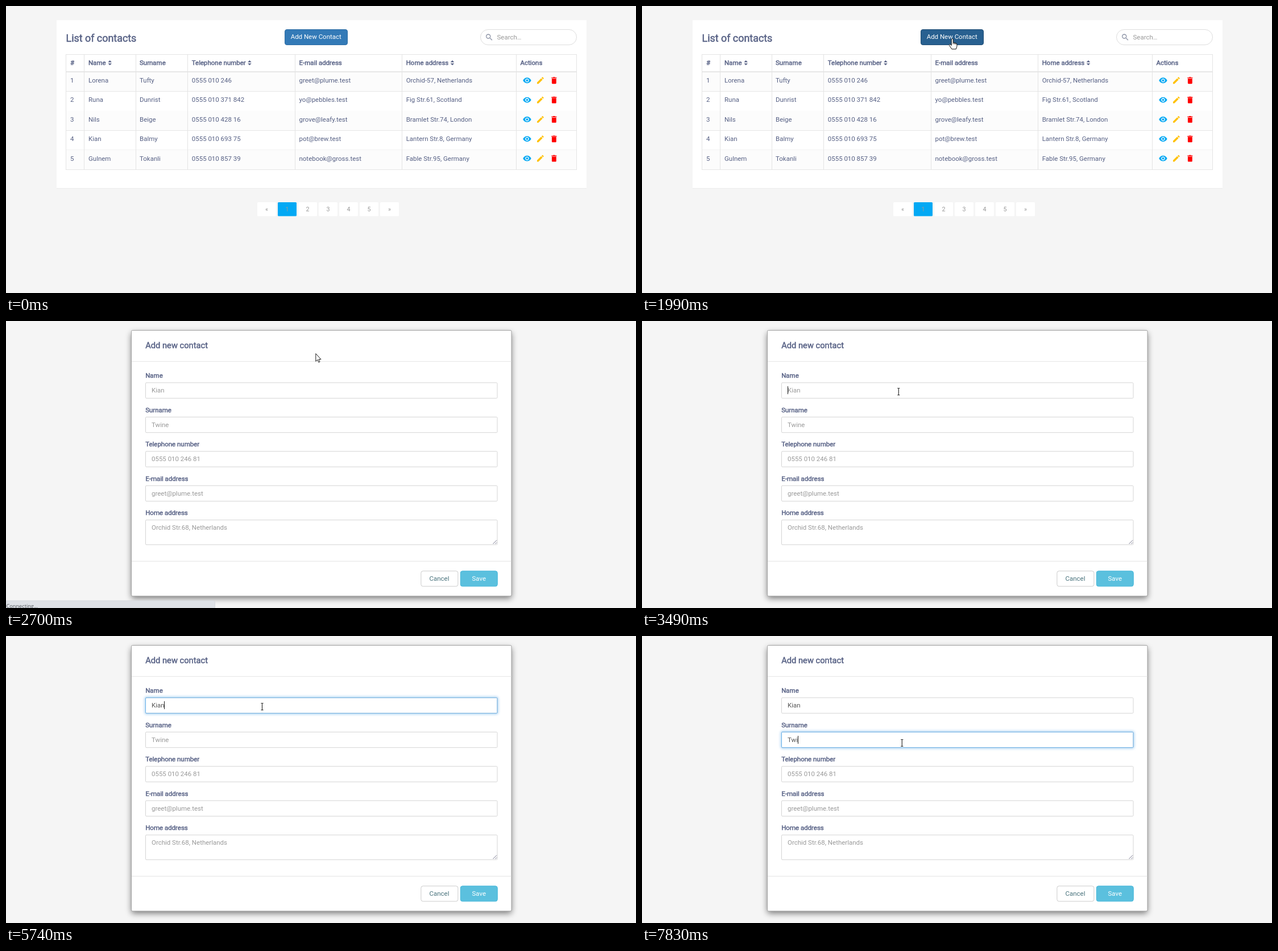
Write an HTML page that moves like this. It is 1108 px wide and 506 px high and loops after 8 s.

```html
<!DOCTYPE html>
<html lang="en">
<head>
<meta charset="utf-8">
<title>Contacts</title>
<style>
html, body { margin: 0; width: 100%; height: 100%; overflow: hidden; background: #f5f5f5; }
svg { display: block; width: 100vw; height: 100vh; }
text { font: 11.48px Roboto, sans-serif; fill: #566084; white-space: pre; }
.bold { stroke: #566084; stroke-width: .45px; }
.h1 { font-size: 17.9px; stroke-width: .5px; }
.h2 { font-size: 14.7px; }
.hint { fill: #999; }
.white { fill: #fff; }
.page { font-size: 10.7px; fill: #999; }
.typed { fill: #555; }
.mid { text-anchor: middle; }
.status { font: 9.2px "Open Sans", sans-serif; fill: #555a60; }
</style>
</head>
<body>
<svg id="stage" viewBox="0 0 1108 506" preserveAspectRatio="none">
  <defs>
    <filter id="shadow" x="-10%" y="-10%" width="120%" height="120%"><feGaussianBlur stdDeviation="5.4"/></filter>
    <filter id="glow" x="-5%" y="-50%" width="110%" height="200%"><feGaussianBlur stdDeviation="2.2"/></filter>
  </defs>
  <rect width="1108" height="506" fill="#f5f5f5"/>
  <g id="list"></g>
  <g id="form"></g>
  <g id="status">
    <path d="M0 493H364.5Q367.5 493 367.5 496V506H0Z" fill="#dee1e6" stroke="#cfd3d8" stroke-width=".7"/>
    <text class="status" x=".5" y="506">Connecting...</text>
  </g>
  <g id="arrow"><path d="M0 0V13.6L3.1 10.8 5.1 15.4 7.1 14.5 5.2 10.1H9.2Z" fill="#fff" stroke="#111" stroke-width=".95"/></g>
  <g id="hand">
    <path d="M-1.5 10.5V1.5a1.5 1.5 0 0 1 3 0V7l4.6 1q2.1.6 2.1 2.6v3.2l-1.6 4.7h-7.4l-4.2-6.2q-1-1.7.3-2.2 1.2-.3 3.2 1.9z" fill="#fff" stroke="#111"/>
    <path d="M1.5 7v2.8M3.8 7.7v2.3M6 8.2v2.2" fill="none" stroke="#111" stroke-width=".9"/>
  </g>
  <g id="beam"><path d="M-2-6H-.7L0-5.4.7-6H2M-2 6H-.7L0 5.4.7 6H2M0-5.4V5.4" fill="none" stroke="#222" stroke-width="1.1"/></g>
</svg>
<script>
const LOOP = 8000;
const $ = id => document.getElementById(id);

const text = (x, y, str, cls = "", extra = "") => `<text x="${x}" y="${y}" class="${cls}" ${extra}>${str}</text>`;
const box = (x, y, w, h, fill, stroke = "none", r = 0, extra = "") =>
  `<rect x="${x}" y="${y}" width="${w}" height="${h}" fill="${fill}" stroke="${stroke}" rx="${r}" ${extra}/>`;
const icon = (x, y, d, fill) => `<path transform="translate(${x} ${y}) scale(.655)" d="${d}" fill="${fill}"/>`;
const sorter = x => `<path d="M${x - 3.3} 99.2l3.3-3.4 3.3 3.4zm0 2h6.6l-3.3 3.4z" fill="#566084"/>`;

const ICONS = {
  search: "M15.5 14h-.79l-.28-.27C15.41 12.59 16 11.11 16 9.5 16 5.91 13.09 3 9.5 3S3 5.91 3 9.5 5.91 16 9.5 16c1.61 0 3.09-.59 4.23-1.57l.27.28v.79l5 4.99L20.49 19zm-6 0C7.01 14 5 11.99 5 9.5S7.01 5 9.5 5 14 7.01 14 9.5 11.99 14 9.5 14z",
  view: "M12 4.5C7 4.5 2.73 7.61 1 12c1.73 4.39 6 7.5 11 7.5s9.27-3.11 11-7.5c-1.73-4.39-6-7.5-11-7.5zM12 17c-2.76 0-5-2.24-5-5s2.24-5 5-5 5 2.24 5 5-2.24 5-5 5zm0-8c-1.66 0-3 1.34-3 3s1.34 3 3 3 3-1.34 3-3-1.34-3-3-3z",
  edit: "M3 17.25V21h3.75L17.81 9.94l-3.75-3.75zM20.71 7.04c.39-.39.39-1.02 0-1.41l-2.34-2.34c-.39-.39-1.02-.39-1.41 0l-1.83 1.83 3.75 3.75z",
  remove: "M6 19c0 1.1.9 2 2 2h8c1.1 0 2-.9 2-2V7H6zM19 4h-3.5l-1-1h-5l-1 1H5v2h14z"
};

const COLS = [113, 145, 235, 326.8, 515.5, 703.7, 904.5];
const HEAD = ["#", "Name", "Surname", "Telephone number", "E-mail address", "Home address", "Actions"];
const PEOPLE = [
  ["Lorena", "Tufty", "0555 010 246", "greet@plume.test", "Orchid-57, Netherlands"],
  ["Runa", "Dunrist", "0555 010 371 842", "yo@pebbles.test", "Fig Str.61, Scotland"],
  ["Nils", "Beige", "0555 010 428 16", "grove@leafy.test", "Bramlet Str.74, London"],
  ["Kian", "Balmy", "0555 010 693 75", "pot@brew.test", "Lantern Str.8, Germany"],
  ["Gulnem", "Tokanli", "0555 010 857 39", "notebook@gross.test", "Fable Str.95, Germany"]
];
const ROW = 34.35;

function buildList() {
  let s = box(89, 26, 932, 296, "#ececec") + box(89, 25, 932, 296, "#fff");
  s += text(105.5, 63, "List of contacts", "bold h1");
  s += box(490.5, 41.5, 110, 27, "#337ab7", "#2e6da4", 3.5, 'id="add"') + text(545.2, 58.4, "Add New Contact", "white mid");
  s += box(834.5, 41.5, 169, 27, "#fff", "#ddd", 13.5) + icon(842, 47.4, ICONS.search, "#8f96a8");
  s += text(863.5, 59, "Search…", "hint");
  PEOPLE.forEach((p, i) => {
    const y = 116 + i * ROW;
    if (i % 2 === 0) s += box(105.5, y, 898, ROW, "#fcfcfc");
    [i + 1, ...p].forEach((str, c) => s += text(COLS[c], (y + 19.1).toFixed(1), str));
    s += icon(908.6, y + 7.4, ICONS.view, "#03a9f4") + icon(932, y + 7.4, ICONS.edit, "#ffc107") + icon(956, y + 7.4, ICONS.remove, "#f00");
    s += `<path d="M105 ${Math.round(y + ROW) + .5}H1004" stroke="#e6e6e6"/>`;
  });
  HEAD.forEach((h, c) => s += text(COLS[c], 104.2, h, "bold"));
  s += [182.7, 428.4, 785].map(sorter).join("");
  s += '<path d="M105 85.5H1004" stroke="#e4e4e4"/><path d="M105 116H1004" stroke="#e0e0e0" stroke-width="1.6"/>';
  s += [105.5, 137.5, 228.5, 319.5, 508.5, 696.5, 897.5, 1003.5].map(x => `<path d="M${x} 85V289" stroke="#e4e4e4"/>`).join("");
  ["«", 1, 2, 3, 4, 5, "»"].forEach((n, i) => {
    const x = 442 + i * 36, on = n === 1;
    s += box(x, 346, 33, 24.5, on ? "#03a9f4" : "#fff", "none", 1.6) + text(x + 16.4, 361.7, n, on ? "page white mid" : "page mid");
  });
  return s;
}

const FIELDS = [
  ["Name", "Kian"], ["Surname", "Twine"], ["Telephone number", "0555 010 246 81"],
  ["E-mail address", "greet@plume.test"], ["Home address", "Orchid Str.68, Netherlands"]
];
const STEP = 60.5;

function buildForm() {
  let s = box(220.5, 21, 668.5, 468, "#000", "none", 3, 'opacity=".5" filter="url(#shadow)"');
  s += box(220.5, 16.5, 668.5, 468.5, "#fff", "#a2a2a2", 2);
  s += '<path d="M221 71.3H888.5M221 423.5H888.5" stroke="#e5e5e5"/>';
  s += text(245.2, 48.4, "Add new contact", "bold h2");
  FIELDS.forEach(([label, hint], i) => {
    const y = 108.8 + i * STEP, h = i === 4 ? 43.6 : 27.4;
    s += text(245.2, y - 8.8, label, "bold");
    if (i < 2) s += box(245.5, y, 618.5, h, "none", "#66afe9", 2, `id="glow${i}" stroke-width="3.4" filter="url(#glow)"`);
    s += box(245.5, y, 618.5, h, "#fff", "#d4d4d4", 1.5);
    if (i < 2) s += box(245.5, y, 618.5, h, "none", "#66afe9", 1.5, `id="ring${i}"`);
    s += text(256, y + 17.2, hint, "hint", `id="field${i}"`);
  });
  s += '<path d="M856.5 393L863 386.5M860.5 393L863 390.5" stroke="#63637c" stroke-width=".9"/>';
  s += box(729.9, 440.8, 65, 27, "#fff", "#ccc", 3.5) + text(762, 457.9, "Cancel", "mid", 'style="fill:#48727c"');
  s += box(799.3, 440.8, 65, 27, "#5bc0de", "#46b8da", 3.5) + text(831.8, 457.9, "Save", "white mid");
  return s + box(256, 115, 1, 14, "#222", "none", 0, 'id="caret"');
}

$("list").innerHTML = buildList();
$("form").innerHTML = buildForm();

const within = (t, a, b) => t >= a && t < b;
const show = (id, on) => $(id).setAttribute("visibility", on ? "visible" : "hidden");
const mix = (a, b, k) => a + (b - a) * k;
const stepped = (t, start, gap, last) => Math.min(last, Math.max(0, Math.floor((t - start) / gap)));

function pointer(t) {
  if (t < 890) return { kind: "" };
  if (t < 2630) {
    const left = 1 - stepped(t, 880, 80, 10) / 10;
    const x = 545 - 212 * left, y = 57.5 + 386 * left ** 2.32;
    const over = x > 490 && x < 601 && y < 69;
    const settle = t < 1770 ? [-.5, 1] : t < 1990 ? [0, 1] : [.7, 0];
    return { kind: over ? "hand" : "arrow", x: x + (over ? settle[0] : 0), y: y + (over ? settle[1] : 0), over };
  }
  if (t < 5880) {
    const k = t < 2940 ? 0 : (stepped(t, 2940, 76, 5) + 1) / 6;
    const ease = k * k * (3 - 2 * k);
    const x = mix(544.8, 451.3, ease), y = mix(57.5, 124.5, ease);
    return { kind: y > 109 ? "beam" : "arrow", x: t < 5740 ? x : x - .8, y };
  }
  const k = [.1, .8, 1][stepped(t, 5880, 75, 2)];
  return { kind: "beam", x: mix(450.5, 457.3, k), y: mix(124.5, 188.5, k) };
}

function typing(i, t, times) {
  const [, hint] = FIELDS[i], el = $("field" + i);
  const count = times.filter(at => t >= at).length;
  const str = count ? hint.slice(0, count) : hint;
  if (el.textContent !== str) el.textContent = str;
  el.setAttribute("class", count ? "typed" : "hint");
  return count ? el.getComputedTextLength() : 0;
}

function focus(i, amount) {
  $("glow" + i).setAttribute("opacity", amount * .6);
  $("ring" + i).setAttribute("opacity", amount);
}

function draw(t) {
  const p = pointer(t);
  for (const kind of ["arrow", "hand", "beam"]) show(kind, p.kind === kind);
  if (p.kind) $(p.kind).setAttribute("transform", `translate(${p.x} ${p.y})`);
  $("arrow").firstElementChild.setAttribute("stroke", t < 2000 ? "#1f8a3c" : "#111");

  $("list").style.display = t < 2550 ? "" : "none";
  $("form").style.display = t >= 2700 ? "" : "none";
  show("status", within(t, 2480, 2940));
  $("add").setAttribute("fill", p.over ? "#286090" : "#337ab7");
  $("add").setAttribute("stroke", p.over ? "#204d74" : "#2e6da4");
  if (t < 2700) return;

  const swap = t < 6210 ? 0 : (stepped(t, 6210, 70, 2)) / 2;
  focus(0, t < 3570 ? 0 : 1 - swap);
  focus(1, swap);
  const first = typing(0, t, [4460, 4850, 5020, 5430]);
  const second = typing(1, t, [7070, 7530, 7830]);
  const caret = $("caret"), row = t < 6210 ? 0 : 1;
  caret.setAttribute("x", Math.round(256 + (row ? second : first) - .4));
  caret.setAttribute("y", row ? 176 : 115);
  caret.setAttribute("opacity", within(t, 3490, 4070) || within(t, 4460, 5880) || within(t, 6210, 6760) || t >= 7070 ? 1 : 0);
}

const start = performance.now();
function tick() {
  draw((performance.now() - start) % LOOP);
  requestAnimationFrame(tick);
}
tick();
</script>
</body>
</html>
```
